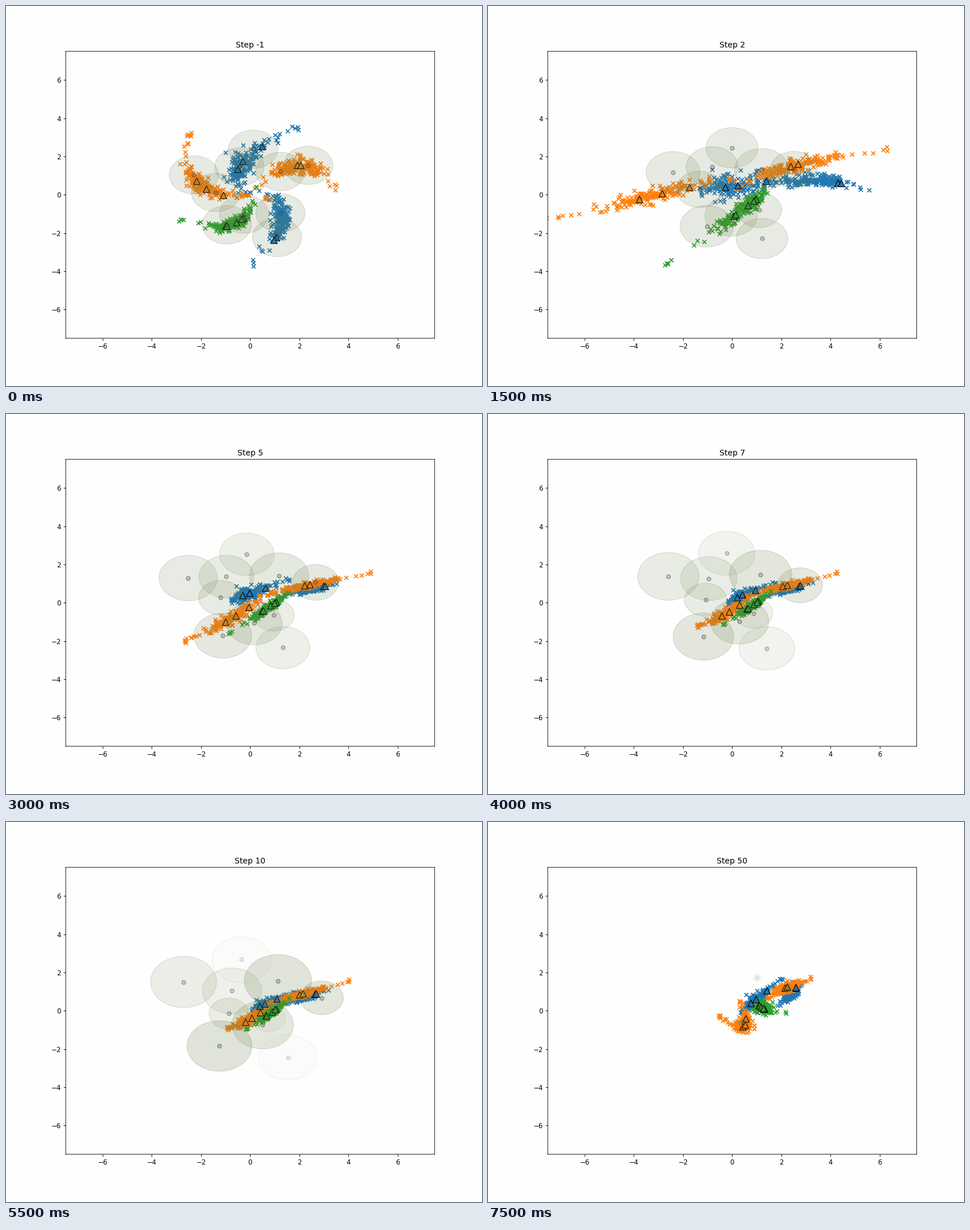
Write a matplotlib script that moves like this. It is 837 px wide and 669 px high and loops after 8000 ms.

```python
import numpy as np
import matplotlib.pyplot as plt
from matplotlib.animation import FuncAnimation
from matplotlib.patches import Circle

W, H, DPI = 837, 669, 83.7
STEPS = [*range(-1, 11), 20, 30, 40, 50]
KEY_STEPS = (-1, 1, 3, 10, 50)
BLUE, ORANGE, GREEN = "tab:blue", "tab:orange", "tab:green"
NUDGE = .42  # half-pixel shift of the axes

rng = np.random.default_rng(4)
plt.rcParams.update({"font.family": "DejaVu Sans", "path.snap": False})
fig = plt.figure(figsize=((W + .001) / DPI, (H + .001) / DPI), dpi=DPI,
                 facecolor="#fefefe")
ax = fig.add_axes([.125 + NUDGE / W, .125 + NUDGE / H, .775, .755],
                  facecolor="#fefefe")
ax.set(xlim=(-7.5, 7.5), ylim=(-7.5, 7.5))
title = ax.set_title("")

clouds, rings = [], []


def relax(s):
    """Exponential settling from 0 to 1."""
    return (1 - np.exp(-4 * s)) / (1 - np.exp(-4))


def parabola(u, lo, mid, hi):
    """Curve through lo, mid and hi at u = -1, 0 and 1."""
    lo, mid, hi = map(np.array, (lo, mid, hi))
    u = np.reshape(u, (-1, 1))
    return mid + u * (hi - lo) / 2 + u ** 2 * (lo + hi - 2 * mid) / 2


def at_step(poses, step):
    i = min(np.searchsorted(KEY_STEPS, step, side="right"), len(KEY_STEPS) - 1)
    a, b = KEY_STEPS[i - 1], KEY_STEPS[i]
    w = relax((step - a) / (b - a))
    return (1 - w) * poses[i - 1] + w * poses[i]


def cloud(color, marks, *shapes, n=190):
    """Class samples along one parabola per key step; marks are query positions."""
    u = np.clip(.48 * rng.standard_t(6, n), -1.6, 1.6)
    noise = np.clip(rng.standard_t(6, (n, 2)), -2.8, 2.8)
    noise *= 1.1 - .4 * np.abs(u[:, None])
    samples = [parabola(u, *p) + spread * noise for spread, *p in shapes]
    queries = [parabola(marks, *p) for _, *p in shapes]
    cross = ax.scatter([], [], marker="x", s=36, c=color, lw=1.5, zorder=2)
    tri = ax.scatter([], [], marker="^", s=100, c=color, edgecolors="k",
                     lw=1, zorder=3)
    clouds.extend([(cross, samples), (tri, queries)])


def ring(start, end, radius, opacity, bow=(0, 0), home=None):
    """Prototype disc; it shrinks onto its home, or fades out without one."""
    disc = ax.add_patch(Circle(start, 1, lw=1, zorder=4))
    dot = ax.scatter([], [], s=36, lw=1, zorder=5)
    rings.append((disc, dot, *map(np.array, (start, end, bow)),
                  radius, opacity, home))


cloud(BLUE, (-.25, .15, .85),
      (.2, (-.5, .6), (-.4, 1.6), (.7, 2.7)),
      (.4, (9.7, -1.4), (12, -1.7), (15.5, -2.3)),
      (.26, (-2.4, .6), (-1.6, .75), (-.2, 1.2)),
      (.08, (.15, .05), (.5, .33), (1.2, .68)),
      (.1, (.5, .1), (.88, .53), (1.5, 1.15)))
cloud(BLUE, (.65, .75),
      (.16, (.95, -.2), (1.3, -1.3), (.75, -2.75)),
      (.38, (1.65, 1.05), (4.6, .4), (10.2, -1.7)),
      (.09, (1.75, .55), (3.2, .8), (4, .83)),
      (.08, (1.7, .55), (2.27, .75), (2.8, .95)),
      (.12, (2.1, .6), (2.45, 1), (2.6, 1.3)))
cloud(ORANGE, (-.15, .25, .75),
      (.16, (-2.55, 1.95), (-2.05, .55), (-.65, -.1)),
      (.3, (-14.2, 17.4), (-9.9, 11.7), (-5.6, 6)),
      (.16, (-4.9, -3.4), (-2.55, -1.7), (-.65, -.2)),
      (.1, (-.65, -.85), (-.1, -.5), (.6, .1)),
      (.13, (0, -.7), (.48, -.8), (.5, -.2)))
cloud(ORANGE, (0, .15),
      (.19, (.75, .9), (1.9, 1.55), (2.9, 1.1)),
      (.75, (-.4, 2.4), (0, 4.9), (.9, 7)),
      (.06, (1.05, .6), (2.7, 1.05), (5.1, 1.4)),
      (.07, (1.2, .57), (2, .85), (3.15, 1.25)),
      (.1, (1.7, .87), (2.15, 1.2), (2.75, 1.5)))
cloud(GREEN, (-.35, -.3, .1, .45, .35),
      (.13, (-1.85, -1.6), (-.65, -1.5), (0, -.6)),
      (.5, (-2.3, -5.3), (0, -2.2), (.4, -.7)),
      (.11, (-1, -1.8), (.6, -.45), (1.3, .15)),
      (.07, (.25, -.6), (.83, -.1), (1.3, .35)),
      (.13, (1.1, .4), (1.15, .2), (1.6, -.05)))

ring((-2.29, 1.04), (-2.71, 1.51), 1.34, .12)
ring((-1.39, .12), (-.86, -.15), .81, .12, bow=(-.1, .3))
ring((-.44, 1.46), (-.74, 1.04), 1.2, .1, bow=(-.37, .14))
ring((.12, 2.38), (-.35, 2.67), 1.2, .02, home=(1.02, 1.72))
ring((1.23, 1.22), (1.13, 1.57), 1.37, .2, home=(2.24, 1.19))
ring((2.36, 1.54), (2.91, .68), .88, .18)
ring((1.23, -.95), (.74, -.39), .69, .06)
ring((1.09, -2.23), (1.53, -2.44), 1.18, .02)
ring((-.95, -1.57), (-1.25, -1.84), 1.32, .2, home=(.42, -.59))
ring((-.25, -1.01), (.51, -.74), 1.25, .17, bow=(0, -.2), home=(1.13, .21))


def update(i):
    step = STEPS[i]
    title.set_text(f"Step {step}")
    for art, poses in clouds:
        art.set_offsets(at_step(poses, step))

    early = min((step + 1) / 11, 1)
    late = max((step - 10) / 40, 0)
    for disc, dot, start, end, bow, radius, opacity, home in rings:
        center = start + early * (end - start) + 4 * early * (1 - early) * bow
        r = 1 + early * (radius - 1)
        a = .15 + early ** 2 * (opacity - .15)
        if home:
            center = center + late * (np.array(home) - center)
            r *= 1 - .85 * late ** 6
        else:
            a *= max(0, 1 - 2 * late)
        seen = min(1, 2.6 * a ** .5)
        disc.set_center(center)
        disc.set_radius(r)
        disc.set_facecolor((.4, .48, .27, a))
        disc.set_edgecolor((.4, .48, .27, .22 * seen))
        dot.set_offsets([center])
        dot.set_facecolor([(.33, .38, .28, .3 * seen)])
        dot.set_edgecolor([(.2, .22, .2, .5 * seen)])
    return []


anim = FuncAnimation(fig, update, frames=len(STEPS), interval=500,
                     init_func=lambda: update(0), repeat=True)
plt.show()
```
